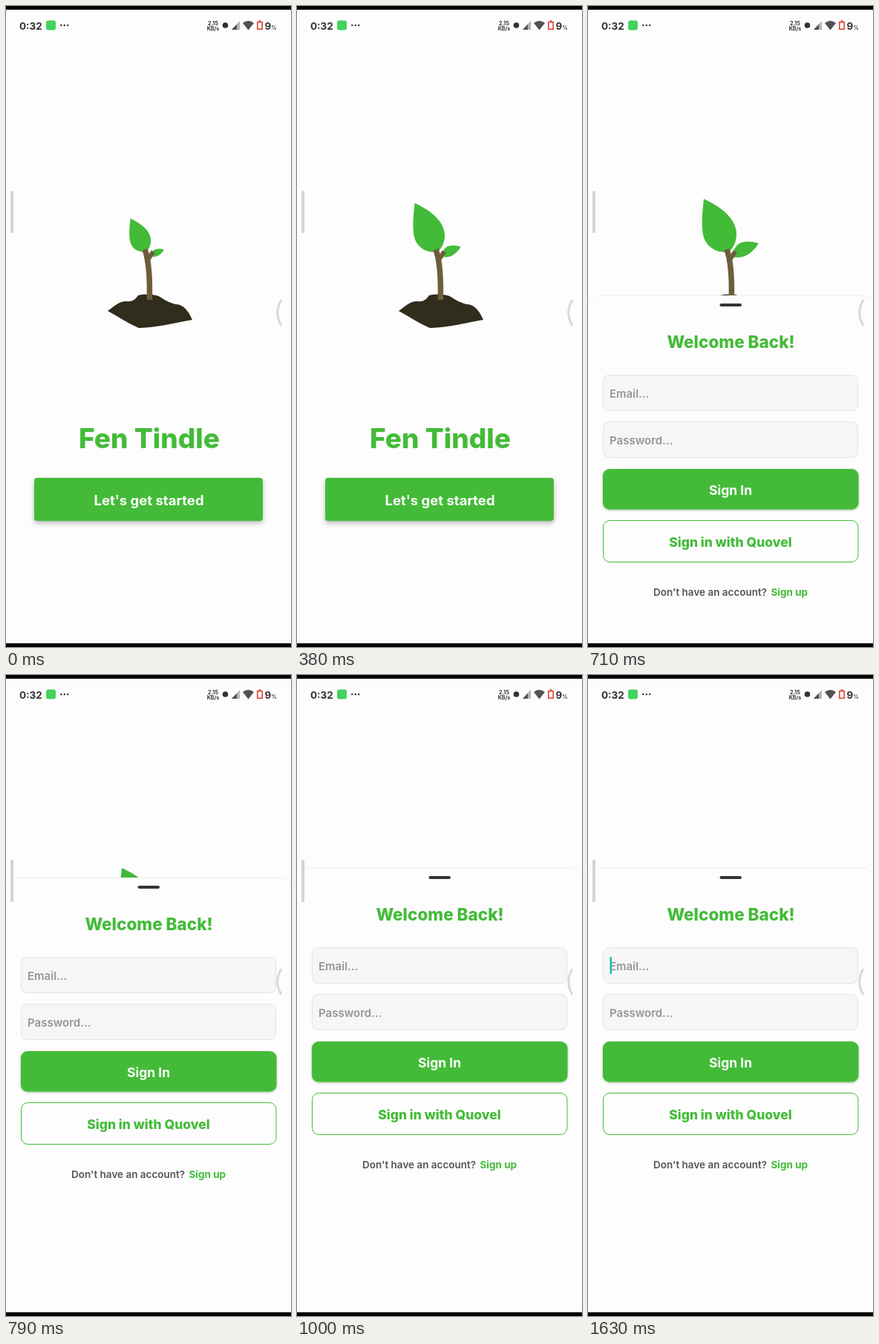
An HTML page that plays this animation: 384 by 864 pixels, repeating every 1930 ms.

```html
<!DOCTYPE html>
<html lang="en">
<head>
<meta charset="utf-8">
<title>Sign-in sheet</title>
<style>
  html, body { margin: 0; width: 100%; height: 100%; overflow: hidden; background: #fdfdfd; }
  svg { display: block; width: 100%; height: 100%; font-family: Inter, sans-serif; font-weight: 700; }
  .green { fill: #43bb38; }
  .mid { text-anchor: middle; }
  .white { fill: #fdfdfd; }
  .field { fill: #f6f6f6; stroke: #e3e3e8; }
  .hint { fill: #959595; font-size: 15px; font-weight: 600; }
  .line { fill: none; stroke-linecap: round; }
  .raised { filter: drop-shadow(0 3px 3px rgba(70, 70, 70, .4)); }
  .low { filter: drop-shadow(0 1.5px 1.5px rgba(60, 130, 50, .5)); }
  .ink { fill: #333330; }
</style>
</head>
<body>
<svg viewBox="0 0 384 864">
  <rect class="white" width="384" height="864"/>

  <!-- Seedling -->
  <path fill="#302d1c" d="M137 411C147 404 152 398 162 398C170 399 174 396 178 390C185 388 203 388 209 393C216 398 222 400 228 402C238 402 245 409 251 423C228 427 205 433 179 434C163 427 150 418 137 411Z"/>
  <path id="bigLeaf" class="green" d="M156 260C176 269 198 284 200 305C201 316 196 326 190 331C176 334 161 327 156 312C152 298 154 279 156 260Z"/>
  <path id="smallLeaf" class="green" d="M230 320C215 315 203 318 199 325C194 331 194 335 195 338C210 342 222 333 230 320Z"/>
  <g fill="none" stroke="#6e5d3c">
    <path stroke-width="7.5" d="M193.3 396C194 370 193 345 187 328"/>
    <path stroke-width="6" d="M191 342L198.5 331"/>
  </g>

  <!-- Welcome screen -->
  <text class="green mid" x="193" y="596" font-size="37" font-weight="800">Fen Tindle</text>
  <g id="startButton">
    <rect class="green raised" x="38" y="636" width="308" height="58" rx="4"/>
    <text class="white mid" x="192.5" y="673" font-size="18.5">Let's get started</text>
  </g>

  <!-- Sign-in sheet -->
  <g id="sheet">
    <path class="white" stroke="#f1f1f1" d="M-1 900V274.5Q-1 260.5 14 260.5H370Q385 260.5 385 274.5V900Z"/>
    <rect class="ink" x="177.5" y="271" width="29.5" height="4" rx="2"/>
    <text class="green mid" x="192.5" y="331" font-size="22.5" font-weight="800">Welcome Back!</text>
    <rect class="field" x="20.5" y="367.5" width="343" height="48" rx="8"/>
    <text class="hint" x="29" y="398">Email...</text>
    <rect class="field" x="20.5" y="430.5" width="343" height="48" rx="8"/>
    <text class="hint" x="29" y="461">Password...</text>
    <rect class="green low" x="20" y="494" width="344.5" height="54.5" rx="9"/>
    <text class="white mid" x="192" y="528.5" font-size="17.5">Sign In</text>
    <rect class="white" x="20.5" y="563.5" width="343.5" height="56" rx="9" stroke="#43bb38"/>
    <text class="green mid" x="192" y="599" font-size="17.5" font-weight="800">Sign in with Quovel</text>
    <text x="88" y="665" font-size="13.5" font-weight="600" fill="#555">Don't have an account?</text>
    <text class="green" x="246.5" y="665" font-size="13.5">Sign up</text>
    <rect id="cursor" x="29.5" y="380" width="2.5" height="23" fill="#1cbfa8"/>
  </g>

  <!-- Status bar -->
  <g class="ink">
    <text x="18" y="31.5" font-size="13.5">0:32</text>
    <rect x="54" y="19.5" width="13" height="13" rx="3" fill="#43d35c"/>
    <circle cx="74.3" cy="26" r="1.2"/>
    <circle cx="78.8" cy="26" r="1.2"/>
    <circle cx="83.2" cy="26" r="1.2"/>
    <text class="mid" x="279" y="26" font-size="7.2">2.15</text>
    <text class="mid" x="279" y="32.5" font-size="7.2">KB/s</text>
    <circle cx="295.5" cy="26" r="3.8"/>
    <path fill="#b4b4b4" d="M304 32L315 20V32Z"/>
    <path fill="#525252" d="M304 32L311 24.4V32Z"/>
    <path fill="#525252" d="M319 23Q326.5 17 334 23L326.5 32.5Z"/>
    <path class="line" stroke="#e0442f" stroke-width="1.6" d="M338.8 21.8H345.2V31.2H338.8ZM341 20H343"/>
    <text x="348.5" y="31.5" font-size="13.5">9</text>
    <text x="357.5" y="31.5" font-size="7">%</text>
  </g>

  <!-- Edge handles and screen bars -->
  <rect x="6" y="249" width="4" height="57" rx="1.5" fill="#d5d5d5"/>
  <path class="line" stroke="#d9d9d9" stroke-width="3" d="M370.5 397Q361 413.5 370.5 430"/>
  <rect width="384" height="5"/>
  <rect y="859" width="384" height="5"/>
</svg>
<script>
  const LOOP = 1930, FRAME = 1000 / 24;
  const SHEET_START = 653, SHEET_TIME = 250, SHEET_TRAVEL = 604;
  const PRESS_START = 495, PRESS_TIME = 150;
  const [bigLeaf, smallLeaf, startButton, sheet, cursor] =
    ['bigLeaf', 'smallLeaf', 'startButton', 'sheet', 'cursor'].map(id => document.getElementById(id));

  const clamp = v => Math.min(1, Math.max(0, v));
  const easeInOut = u => u < .5 ? 2 * u * u : 1 - 2 * (1 - u) ** 2;
  const expoOut = u => u <= 0 ? 0 : u >= 1 ? 1 : 1 - 2 ** (-10 * u);

  function growFrom(leaf, x, y, scale) {
    leaf.setAttribute('transform', `translate(${x} ${y}) scale(${scale}) translate(${-x} ${-y})`);
  }

  function draw(t) {
    growFrom(bigLeaf, 187, 331, Math.sin(Math.PI / 2 * (.43 + .57 * clamp(t / 690))));
    growFrom(smallLeaf, 196, 337, Math.min(1.03, .5 + t * 5e-4 + t * t * 2.8e-7));
    startButton.setAttribute('opacity', 1 - .8 * easeInOut(clamp((t - PRESS_START) / PRESS_TIME)));
    const offset = SHEET_TRAVEL * (1 - expoOut((t - SHEET_START) / SHEET_TIME));
    sheet.setAttribute('transform', `translate(0 ${Math.round(offset)})`);
    cursor.setAttribute('visibility', t > 1600 ? 'visible' : 'hidden');
  }

  const start = performance.now();
  function tick() {
    const t = (performance.now() - start) % LOOP;
    draw(Math.floor((t + 5) / FRAME) * FRAME);
    requestAnimationFrame(tick);
  }
  tick();
</script>
</body>
</html>
```
